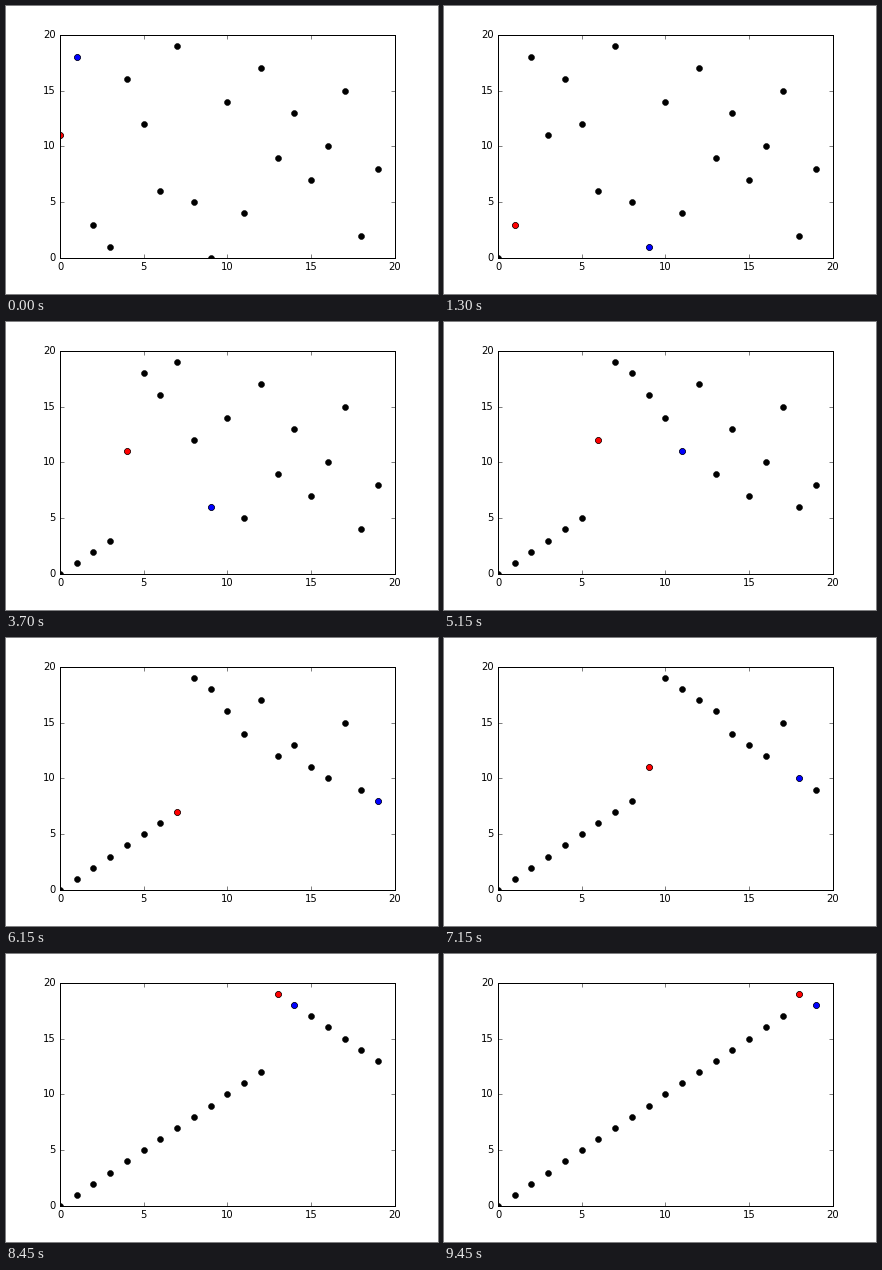
Write a matplotlib script that moves like this. It is 432x288 px and loops after 9.5 s.

```python
import matplotlib.pyplot as plt
from matplotlib.animation import FuncAnimation

DPI = 72
INTERVAL = 50
START = [11, 18, 3, 1, 16, 12, 6, 19, 5, 0,
         14, 4, 17, 9, 13, 7, 10, 15, 2, 8]

plt.style.use("classic")
plt.rcParams.update({
    "font.family": "DejaVu Sans",
    "font.size": 10,
    "xtick.labelsize": 10,
    "ytick.labelsize": 10,
    "savefig.dpi": "figure",
})


def exchange_sort(values):
    """Return (values, i, j) for every comparison, before any swap."""
    a = list(values)
    steps = []
    for i in range(len(a) - 1):
        for j in range(i + 1, len(a)):
            steps.append((a[:], i, j))
            if a[j] < a[i]:
                a[i], a[j] = a[j], a[i]
    return steps


steps = exchange_sort(START)
size = len(START)

fig = plt.figure(figsize=(432 / DPI, 288 / DPI), dpi=DPI, facecolor="white")
ax = fig.add_axes([0.125, 0.125, 0.775, 0.775])
ax.set_xlim(0, size)
ax.set_ylim(0, size)
ax.set_xticks(range(0, size + 1, 5))
ax.set_yticks(range(0, size + 1, 5))

dots, = ax.plot([], [], "ko")
left, = ax.plot([], [], "ro")
right, = ax.plot([], [], "bo")


def draw(frame):
    a, i, j = steps[frame]
    dots.set_data(range(size), a)
    left.set_data([i], [a[i]])
    right.set_data([j], [a[j]])
    return dots, left, right


anim = FuncAnimation(fig, draw, frames=len(steps), interval=INTERVAL,
                     repeat=True, repeat_delay=0, blit=False)
plt.show()
```
